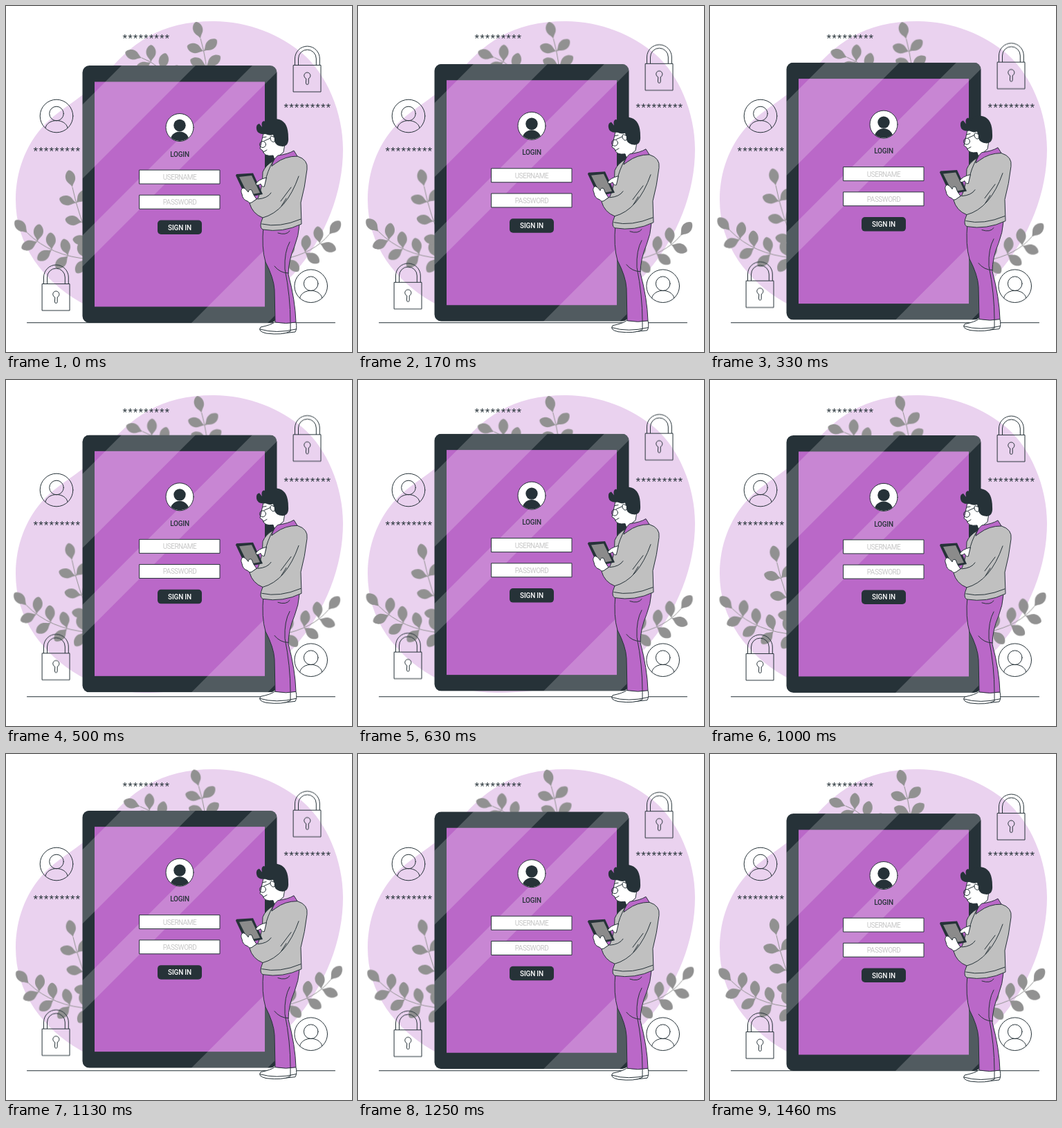
An HTML page that plays this animation: 500x500 px, repeating every 1500 ms.

```html
<!DOCTYPE html>
<html lang="en">
<head>
<meta charset="utf-8">
<title>Login</title>
<style>
html, body { margin: 0; width: 100%; height: 100%; overflow: hidden; background: #fff; }
svg { display: block; width: 100%; height: 100%; }
.float { animation: float 1.5s linear -20ms infinite; }
.wind { animation: wind 1.5s linear -20ms infinite; transform-origin: 249.5px 205px; }
@keyframes float {
  0%, 100% { transform: translateY(.3px); }
  50% { transform: translateY(-9.7px); }
}
@keyframes wind {
  0%, 100% { transform: rotate(0deg); }
  25% { transform: rotate(1deg); }
  75% { transform: rotate(-1deg); }
}
.ink { fill: #263238; }
.purple { fill: #ba68c8; }
.grey { fill: #c0c0c0; }
.white { fill: #fff; }
.shine { fill: #fff; fill-opacity: .2; }
.line { fill: none; }
.line, .edge { stroke: #263238; stroke-linecap: round; stroke-linejoin: round; }
.stem { fill: none; stroke: #919191; }
.leaf { fill: #919191; }
.stars { font: 17px "Liberation Sans", Arial, sans-serif; letter-spacing: 1px; }
.label { font: 500 10px "Liberation Sans Narrow", Roboto, sans-serif; letter-spacing: -.2px; text-anchor: middle; }
.hint { font-weight: 400; letter-spacing: -.5px; fill: #c7c7c7; }
</style>
</head>
<body>
<svg viewBox="0 0 500 500">
  <defs>
    <clipPath id="case"><rect x="110.5" y="86" width="281" height="372" rx="10"/></clipPath>
    <clipPath id="disc"><circle r="19.5"/></clipPath>
    <g id="lock" class="line">
      <path d="M2 0V-9.5a17.900 17.900 0 0 1 35.800 0V0M7 0V-9.500a12.900 12.900 0 0 1 25.800 0V0"/>
      <rect width="39.500" height="38.500"/>
      <path d="M17.900 19.300a4.600 4.600 0 1 1 3.800 0V26a1.900 1.900 0 0 1-3.800 0Z"/>
    </g>
    <g id="user" class="line">
      <circle r="23.800"/>
      <circle cy="-3.500" r="10.300"/>
      <path d="M-16 17C-13 3 13 3 16 17"/>
    </g>
    <g id="field">
      <rect class="white edge" x="-58" width="116" height="20"/>
    </g>
    <path id="leaf" class="leaf" d="M0 0C.25-.08 .3-.3 .62-.28C.85-.26 1-.08 1 0C1 .08 .85 .26 .62 .28C.3 .3 .25 .08 0 0Z"/>
  </defs>

  <path fill="#ead2ef" d="M300 22C350 22 398 42 430 70C463 99 487 153 487 207C487 268 463 333 415 388C378 427 285 452 200 452C130 452 73 414 41 368C23 341 14 312 14 280C14 238 29 203 50 178C70 153 108 135 140 104C180 54 222 22 300 22Z"/>
  <g id="plants" class="wind"></g>

  <g class="ink stars">
    <text x="168.600" y="53">*********</text>
    <text x="39.600" y="216">*********</text>
    <text x="401.600" y="153">*********</text>
  </g>
  <use href="#user" x="73" y="159"/>
  <use href="#user" x="440.700" y="404.700"/>
  <path class="line" d="M30.500 457.700H475.500"/>

  <g class="float">
    <use href="#lock" x="415.500" y="85.500"/>
    <use href="#lock" x="52.500" y="401.500"/>

    <g clip-path="url(#case)">
      <rect class="ink" x="110" y="86" width="282" height="372"/>
      <rect class="purple" x="128" y="109.500" width="246" height="325"/>
      <g id="shine" class="shine"></g>
    </g>
    <g transform="translate(251 175.500)">
      <circle class="white edge" r="20"/>
      <g class="ink" clip-path="url(#disc)">
        <circle cy="-3" r="8.700"/>
        <ellipse cy="19" rx="13.500" ry="13"/>
      </g>
    </g>
    <text class="label ink" x="251" y="217.700">LOGIN</text>
    <use href="#field" x="251" y="237"/>
    <use href="#field" x="251" y="273.200"/>
    <text class="label hint" x="251" y="251">USERNAME</text>
    <text class="label hint" x="251" y="287">PASSWORD</text>
    <rect class="ink" x="219" y="309.500" width="64" height="20.500" rx="5"/>
    <text class="label white" x="251" y="323.500">SIGN IN</text>

    <!-- shoes and trousers -->
    <g class="edge">
      <path class="white" d="M409 457H419Q421 466 418 471L400 473Z"/>
      <path class="white" d="M388 457Q383 461 368 464Q363 470 376 473Q400 476 411 470V458Z"/>
      <path class="purple" d="M372 318Q369 350 375 370Q387 393 388 410L389 457Q405 460 419 457Q418 425 408 388Q408 368 417 347Q423 332 424 316Z"/>
      <path class="line" d="M367 467Q390 474 419 467M410 341Q402 355 403 380Q411 420 411 457M393 328Q405 332 410 325M388 376Q396 386 408 386"/>
    </g>
    <!-- sweater and collar -->
    <g class="edge">
      <path class="grey" d="M386 224Q400 212 421 217Q437 222 435 236Q432 262 426 284L427 315Q400 328 371 323Q365 320 371 306Q356 300 352 285L364 278Q371 262 371 240Q375 230 386 224Z"/>
      <path class="line" d="M371 306Q405 297 423 246M370 315Q395 321 426 308M364 279Q378 278 383 270M412 262L397 282M405 278L398 289M386 224Q377 240 375 253"/>
      <path class="white" d="M372 184L367 206L371 209Q373 218 386 216L388 222L401 211L404 193L385 176Z"/>
      <path class="purple" d="M384 231Q387 220 393 216Q408 214 416 209L421 217Q403 217 390 227Z"/>
    </g>
    <!-- hair, ear and glasses -->
    <path class="ink" d="M375 185Q363 186 362 178Q361 171 366 170L370 175Q368 167 373 166L377 170Q382 160 395 164Q408 168 408 190Q409 202 400 203Q389 202 388 195L386 186Q381 188 375 185Z"/>
    <g class="edge">
      <path class="white" d="M388 190Q381 185 382 192Q384 198 388 196Z"/>
      <circle class="line" cx="371" cy="200" r="4.500"/>
      <path class="line" d="M382 191L373 195M371 190L376 189M372 211L377 208"/>
    </g>
    <!-- handheld and hands -->
    <path class="ink" d="M333 243L357 241.500L371 272L347 277L332 245Z"/>
    <path fill="#8b8b8b" d="M337 247L355 245L367 270L350 273Z"/>
    <g class="edge">
      <path class="white" d="M376 248Q364 251 361 257Q362 261 368 257Q370 262 373 261Z"/>
      <path class="white" d="M342 263Q338 266 341 272Q342 280 349 282Q352 286 355 284L362 279Q357 273 355 266Q351 264 350 269Q345 262 342 263Z"/>
    </g>
  </g>
</svg>
<script>
// A plant is a quadratic stem from root over bend to tip, with pairs of leaves.
const plants = [
  { root: [122, 366], bend: [65, 362], tip: [31, 328], pairs: 4 },
  { root: [124, 345], bend: [105, 305], tip: [96, 262], pairs: 3 },
  { root: [240, 112], bend: [222, 84], tip: [196, 75], pairs: 3 },
  { root: [291, 112], bend: [291, 82], tip: [281, 47], pairs: 3 },
  { root: [400, 366], bend: [445, 357], tip: [467, 330], pairs: 3 }
];
const SPREAD = 60, LENGTH = 25;

const leaf = ([x, y], turn) =>
  `<use href="#leaf" transform="translate(${x} ${y}) rotate(${turn}) scale(${LENGTH})"/>`;

function plant({ root, bend, tip, pairs }) {
  const at = t => root.map((r, i) =>
    (1 - t) ** 2 * r + 2 * t * (1 - t) * bend[i] + t * t * tip[i]);
  const heading = t => {
    const [dx, dy] = root.map((r, i) => (1 - t) * (bend[i] - r) + t * (tip[i] - bend[i]));
    return Math.atan2(dy, dx) * 180 / Math.PI;
  };
  let out = `<path class="stem" d="M${root}Q${bend} ${tip}"/>` + leaf(tip, heading(1));
  for (let k = 0; k < pairs; k++) {
    const t = (k + .2) / pairs;
    out += leaf(at(t), heading(t) - SPREAD) + leaf(at(t), heading(t) + SPREAD);
  }
  return out;
}

// A 45 degree band of light between the lines x + y = from and x + y = to.
const band = ([from, to]) => `<path d="M${from} 0H${to}L${to - 500} 500H${from - 500}Z"/>`;

const fill = (id, items, draw) => {
  document.getElementById(id).innerHTML = items.map(draw).join("");
};
fill("plants", plants, plant);
fill("shine", [[253, 360], [442, 487], [726, 836]], band);
</script>
</body>
</html>
```
